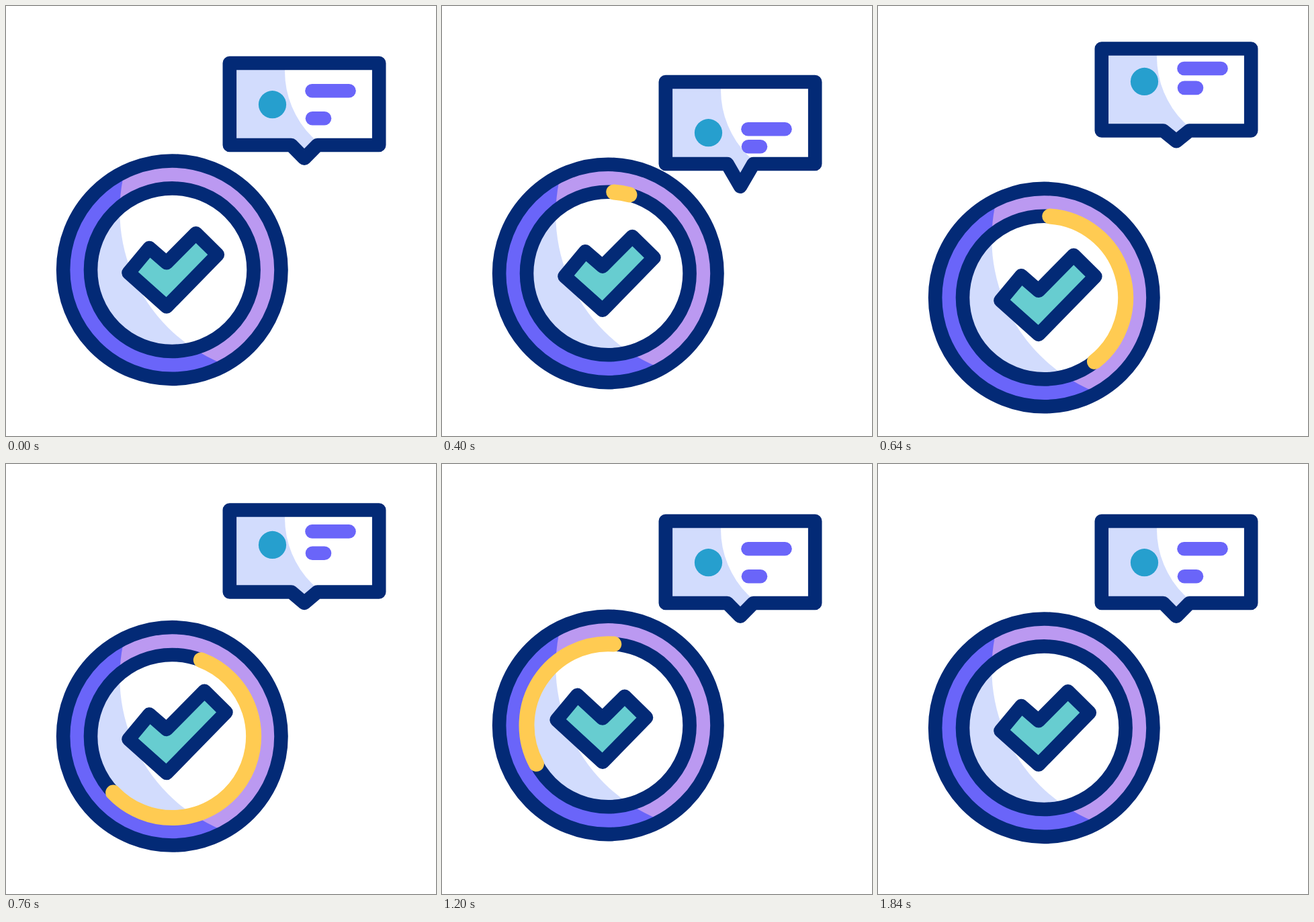
An HTML page for the animation above (2 s loop, 640 px wide and 640 px high).

```html
<!DOCTYPE html>
<html lang="en">
<head>
<meta charset="utf-8">
<title>Check badge and message</title>
<style>
  html, body { margin: 0; width: 100%; height: 100%; overflow: hidden; background: #fff; }
  svg { display: block; width: 100vw; height: 100vh; }
  .line { fill: none; stroke: #032a76; stroke-width: 20.6; stroke-linejoin: round; }
  .bar { stroke: #6a65f9; stroke-width: 20.6; stroke-linecap: round; }
</style>
</head>
<body>
<svg viewBox="0 0 640 640">
  <defs>
    <clipPath id="coinClip"><circle cx="247.3" cy="392.7" r="162"/></clipPath>
    <clipPath id="faceClip"><circle cx="247.3" cy="392.7" r="121"/></clipPath>
    <clipPath id="bubbleClip"><path class="outline"/></clipPath>
  </defs>

  <g id="coin">
    <circle cx="247.3" cy="392.7" r="162" fill="#6a65f9"/>
    <circle cx="415" cy="305" r="245.7" fill="#bb99f1" clip-path="url(#coinClip)"/>
    <circle cx="247.3" cy="392.7" r="121" fill="#d2dcfd"/>
    <circle cx="415" cy="305" r="245.7" fill="#fff" clip-path="url(#faceClip)"/>
    <circle class="line" cx="247.3" cy="392.7" r="162.2"/>
    <circle class="line" cx="247.3" cy="392.7" r="121.3"/>
    <path id="arc" fill="none" stroke="#ffcb52" stroke-width="23" stroke-linecap="round"/>
    <path id="check" class="line" style="fill:#67cdd0"/>
  </g>

  <g clip-path="url(#bubbleClip)">
    <g id="shade">
      <rect x="320" y="60" width="250" height="220" fill="#d2dcfd"/>
      <path d="M415 60V97A138 138 0 0 0 553 235H570V60Z" fill="#fff"/>
    </g>
  </g>
  <path class="line outline"/>
  <circle id="dot" cx="396.5" cy="146.7" r="20.6" fill="#269fce"/>
  <path id="bar1" class="bar" d="M455.5 126.3H510.5"/>
  <path id="bar2" class="bar" d="M456 167.3H474"/>
</svg>
<script>
const $ = id => document.getElementById(id);
const outlines = document.querySelectorAll('.outline');

const ease = (t, from, to) => {
  const u = Math.min(1, Math.max(0, (t - from) / (to - from)));
  return u * u * (3 - 2 * u);
};

// Eased value through [time, value] keys
function track(t, ...keys) {
  let value = keys[0][1];
  for (let i = 1; i < keys.length; i++)
    value += (keys[i][1] - keys[i - 1][1]) * ease(t, keys[i - 1][0], keys[i][0]);
  return value;
}

const bob = (t, low, high) => track(t, [100, 0], [400, low], [667, high], [933, 0]);
const shift = (id, y) => $(id).setAttribute('transform', `translate(0 ${y})`);

function drawBubble(t) {
  const y = bob(t, 28, -23), base = 207 + y, tip = 226.7 + bob(t, 42, -27.5);
  const d = `M332.8 ${85 + y}H555.2V${base}H463.5L444 ${tip}L424.5 ${base}H332.8Z`;
  outlines.forEach(path => path.setAttribute('d', d));
  shift('shade', y);
  shift('dot', bob(t, 42, -36.5));
  shift('bar1', bob(t, 57, -36));
  shift('bar2', bob(t, 42, -48));
}

function drawCheck(t) {
  const arm = track(t, [333, 0], [880, 14.9], [1300, -15.5], [1833, 0]);
  const hook = track(t, [833, 0], [1333, 15], [1833, 0]);
  const points = [
    [182.5 - hook * .96, 397 - hook], [213.3 - hook * .96, 360 - hook],
    [239, 382.3],
    [282.7 + arm * .97, 338.3 - arm], [314.8 + arm * .97, 370 - arm],
    [239, 447.5]
  ];
  $('check').setAttribute('d', 'M' + points.join('L') + 'Z');
}

function drawArc(t) {
  const angleAt = part => (part * 360 + 4) * Math.PI / 180;
  const point = a => [247.3 + 121.3 * Math.sin(a), 392.7 - 121.3 * Math.cos(a)];
  const start = angleAt(ease(t, 640, 1560)), end = angleAt(ease(t, 320, 1080));
  const large = end - start > Math.PI ? 1 : 0;
  $('arc').setAttribute('d', end - start < .001 ? '' :
    `M${point(start)}A121.3 121.3 0 ${large} 1 ${point(end)}`);
}

function frame() {
  // 25 steps per second
  const t = Math.floor((performance.now() + 4) / 40) * 40 % 2000;
  shift('coin', track(t, [333, 0], [633, 41.5], [933, -33.5], [1270, 0]));
  drawBubble(t);
  drawCheck(t);
  drawArc(t);
  requestAnimationFrame(frame);
}
frame();
</script>
</body>
</html>
```
